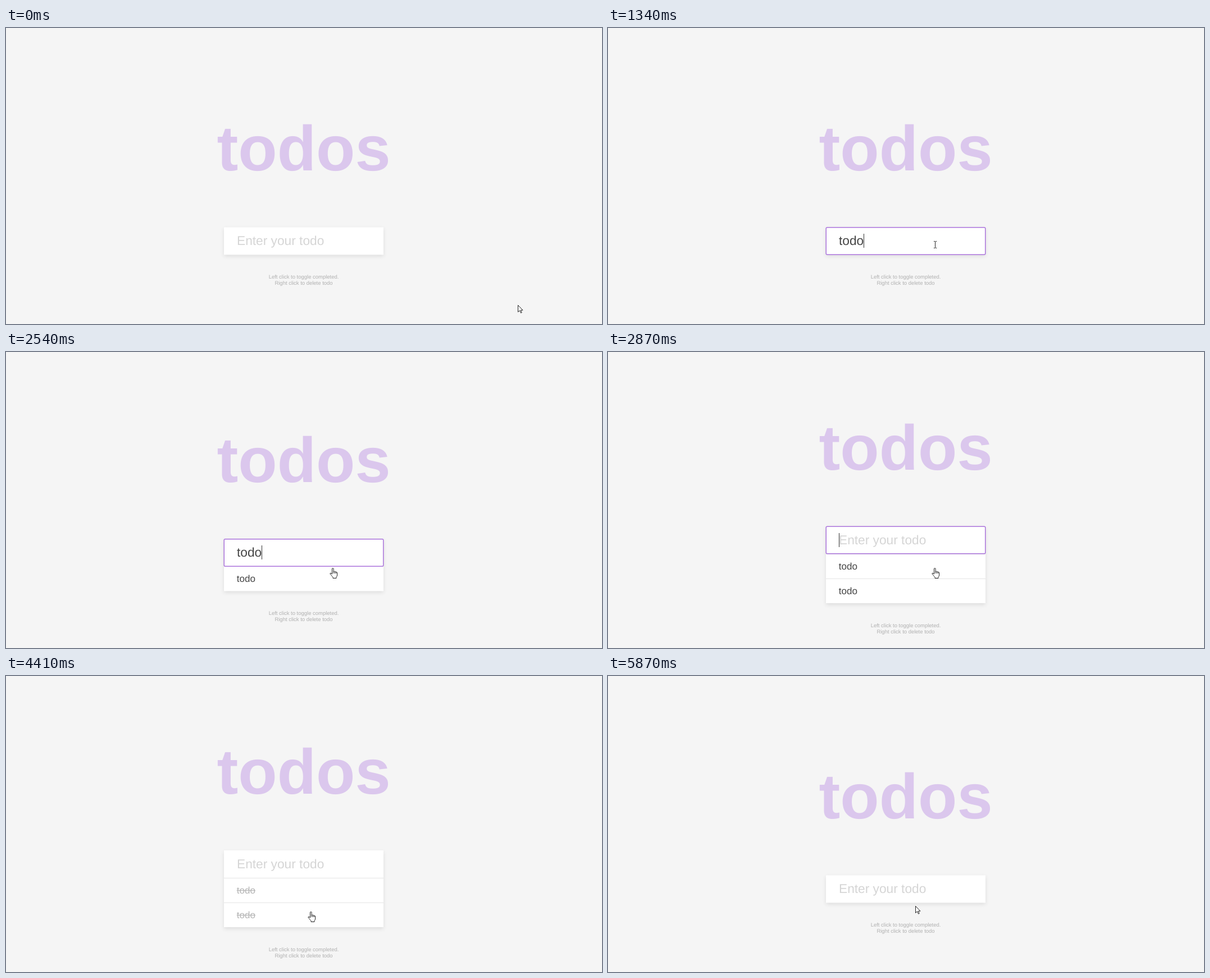
Animation, 1061 px wide and 528 px high, one loop 6930 ms. Source, as an HTML page with a canvas:

```html
<!DOCTYPE html>
<html lang="en">
<head>
<meta charset="utf-8">
<title>todos</title>
<style>
  html, body { margin: 0; width: 100%; height: 100%; overflow: hidden; background: #f5f5f5; }
  canvas { display: block; }
</style>
</head>
<body>
<canvas id="stage" width="1061" height="528"></canvas>
<script>
const ctx = document.getElementById('stage').getContext('2d');
const LOOP = 6930, TICK = 200 / 3;
const LEFT = 388, WIDTH = 284, FIELD = 49, ROW = 44;
const TOPS = [355.5, 333.5, 311];

// Pointer moves: start, end, from, to
const MOVES = [
  [0, 333, [911, 494], [582, 386]],
  [3933, 4280, [582, 386], [543, 421]],
  [5200, 5400, [543, 421], [547, 410]]
];
const CLICKS = [[400, 540], [3610, 3680], [4340, 4410], [4940, 5010], [5790, 5870]];
const CARET = [[540, 1010], [1080, 1950], [2140, 3080]];
const KEYS = [[0, ''], [1080, 't'], [1210, 'to'], [1270, 'tod'], [1340, 'todo'], [1610, ''],
  [2140, 't'], [2270, 'to'], [2400, 'tod'], [2540, 'todo'], [2870, '']];
// Whether each listed todo is done
const LISTS = [[0, []], [1610, [false]], [2870, [false, false]], [3680, [true, false]],
  [4410, [true, true]], [5010, [true]], [5870, []]];

const ARROW = new Path2D('M.5.5V12.6L3.5 9.9 5.5 14.3 7.2 13.5 5.3 9.3H9z');
const HAND = new Path2D('M4.5 11V1.9a1.3 1.3 0 0 1 2.6 0V7.2q.3-1.2 1.3-1 1.1 0 1.1 1.3.3-.9 1.2-.8 ' +
  '1.1.1 1.1 1.3.4-.6 1-.4.8.2.8 1.4v4q0 2-1.6 3.6v1.9H6v-1.9Q4 14.5 2.6 12.6.4 10.6 1 9.8 1.8 9 3 10z');
const KNUCKLES = new Path2D('M7.1 7v3M9.5 7.5v2.5M11.8 8v2');
const BEAM = new Path2D('M-2 -5.5H0M1 -5.5H3M.5 -5V6M-2 6.5H0M1 6.5H3');

const latest = (list, t) => list.filter(e => e[0] <= t).pop()[1];
const during = (list, t) => list.some(([a, b]) => t >= a && t < b);

function pointerAt(t) {
  const q = Math.floor((t + 4) / TICK) * TICK;
  const [a, b, from, to] = MOVES.filter(m => q >= m[0]).pop();
  const u = Math.min(1, (q - a) / (b - a));
  const k = u * u * (3 - 2 * u);
  return from.map((v, i) => Math.round(v + (to[i] - v) * k));
}

function label(str, x, y, size, color, { weight = '', align = 'left' } = {}) {
  ctx.font = `${weight} ${size}px "Liberation Sans", Arial, sans-serif`;
  ctx.textRendering = 'geometricPrecision';
  ctx.textAlign = align;
  ctx.fillStyle = color;
  ctx.fillText(str, x, y);
}

function drawCard(top, height) {
  ctx.save();
  ctx.shadowColor = 'rgba(0,0,0,.1)';
  ctx.shadowBlur = 7.1;
  ctx.shadowOffsetY = 2.84;
  ctx.fillStyle = '#fff';
  ctx.fillRect(LEFT, top, WIDTH, height);
  ctx.restore();
}

function drawItem(y, done) {
  ctx.fillStyle = '#e5e5e5';
  ctx.fillRect(LEFT, y, WIDTH, 1);
  const color = done ? '#b6b6b6' : '#444';
  label('todo', 410.7, y + 28, 17.04, color);
  if (done) ctx.fillRect(410.7, y + 22, 33.2, 1.2);
}

function drawField(t, top) {
  const typed = latest(KEYS, t);
  const base = Math.floor(top) + 32;
  label(typed || 'Enter your todo', 411, base, 22.72, typed ? '#444' : '#d5d5d5');
  if (t < 540 || t >= 3610) return;
  if (during(CARET, t)) {
    const x = Math.round(411 + (typed ? ctx.measureText(typed).width : 0));
    ctx.fillStyle = '#333';
    ctx.fillRect(x, base - 20, 1, 25);
  }
  ctx.strokeStyle = '#ab74dc';
  ctx.lineWidth = 1.5;
  ctx.beginPath();
  ctx.roundRect(LEFT + .25, top + .25, WIDTH - .5, FIELD - .5, 2);
  ctx.stroke();
}

function drawPointer(t, top, count) {
  const [x, y] = pointerAt(t);
  if (during(CLICKS, t)) {
    ctx.fillStyle = 'rgba(255,255,0,.55)';
    ctx.beginPath();
    ctx.arc(x - 1.5, y - .5, 9.5, 0, 7);
    ctx.fill();
  }
  const depth = x >= LEFT && x < LEFT + WIDTH ? y - top : -1;
  ctx.save();
  ctx.translate(x, y);
  ctx.lineWidth = 1;
  ctx.strokeStyle = '#222';
  ctx.fillStyle = '#fff';
  if (depth >= 0 && depth < FIELD) {
    ctx.stroke(BEAM);
  } else if (depth >= FIELD && depth < FIELD + ROW * count) {
    ctx.translate(-6, -1);
    ctx.fill(HAND);
    ctx.stroke(HAND);
    ctx.stroke(KNUCKLES);
  } else {
    ctx.fill(ARROW);
    ctx.stroke(ARROW);
  }
  ctx.restore();
}

function draw(t) {
  const items = latest(LISTS, t);
  const n = items.length;
  const top = TOPS[n];
  ctx.fillStyle = '#f5f5f5';
  ctx.fillRect(0, 0, 1061, 528);
  label('todos', 530, 254 - 22 * n, 113.6, 'rgba(179,131,226,.4)', { weight: 'bold', align: 'center' });
  drawCard(top, FIELD + ROW * n);
  items.forEach((done, i) => drawItem(Math.floor(top) + FIELD + ROW * i, done));
  drawField(t, top);
  ['Left click to toggle completed.', 'Right click to delete todo'].forEach((line, i) =>
    label(line, 530, 447 + 22 * n + 11 * i, 9.47, '#b0b0b0', { align: 'center' }));
  drawPointer(t, top, n);
}

const start = performance.now();
function frame() {
  draw((performance.now() - start) % LOOP);
  requestAnimationFrame(frame);
}
frame();
</script>
</body>
</html>
```
